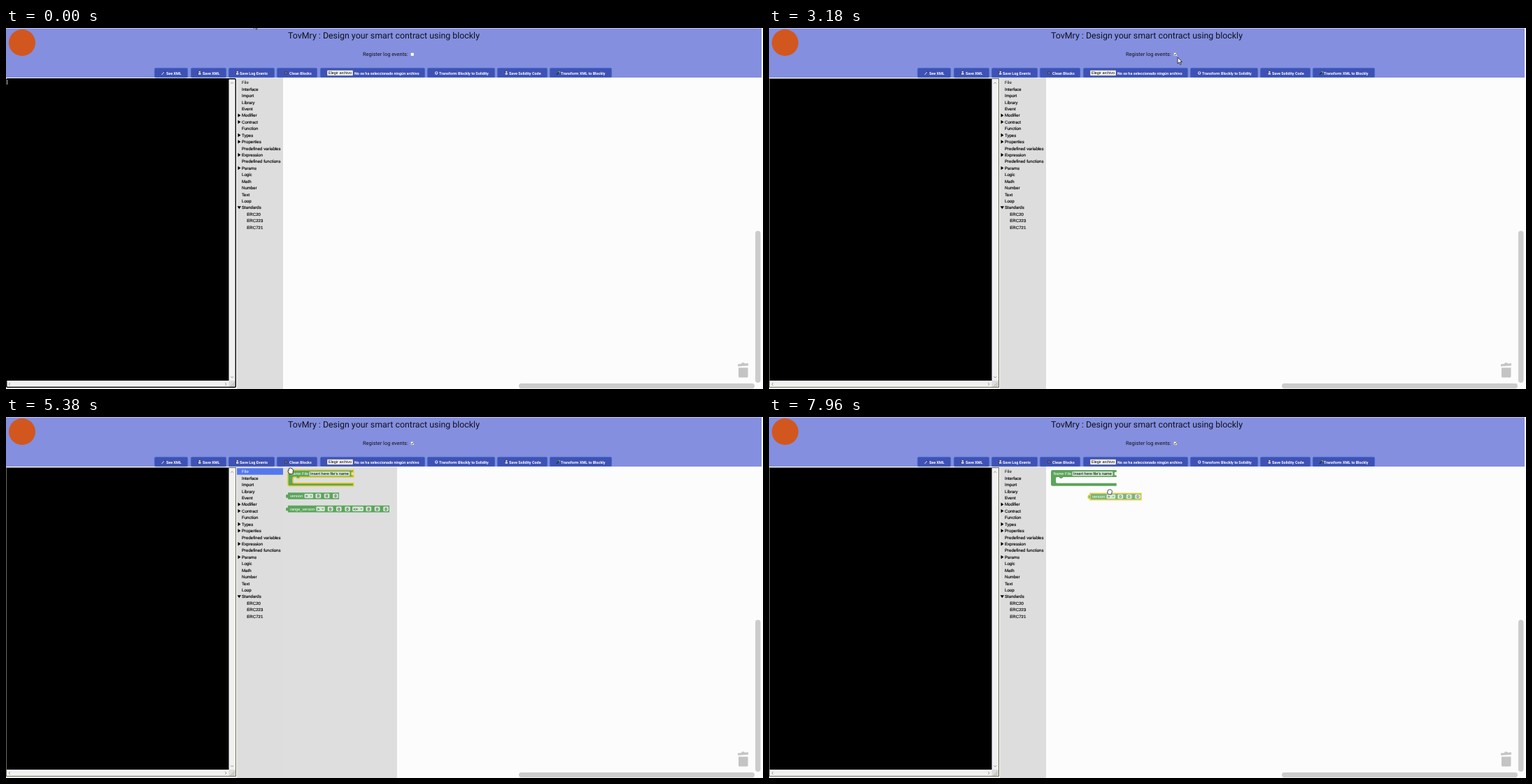
Write an HTML page that moves like this. It is 1082 px wide and 517 px high and loops after 8 s.

```html
<!DOCTYPE html>
<html lang="en">
<head>
<meta charset="utf-8">
<title>Block editor</title>
<style>
  html, body { margin: 0; width: 100%; height: 100%; overflow: hidden; background: #fcfcfc; }
  svg { display: block; width: 100vw; height: 100vh; }
  text { font-family: "Liberation Sans", Arial, sans-serif; white-space: pre; text-rendering: geometricPrecision; }
  .ui { font-family: Roboto, sans-serif; }
  .category { stroke: #000; stroke-width: .15px; }
</style>
</head>
<body>
<svg id="stage" viewBox="0 0 1082 517"></svg>
<script>
const LOOP = 8000;
const GREEN = '#5ba55b', FIELD = '#cfe4cf', YELLOW = '#e9c922';
const ROW_TOP = 73.3, ROW_H = 9.43;

const rect = (x, y, w, h, fill, extra = '') =>
  `<rect x="${x}" y="${y}" width="${w}" height="${h}" fill="${fill}" ${extra}/>`;
const path = (d, fill, extra = '') => `<path d="${d}" fill="${fill}" ${extra}/>`;
const label = (x, y, size, str, fill = '#000', extra = '') =>
  `<text x="${x}" y="${y}" font-size="${size}" fill="${fill}" ${extra}>${str}</text>`;
const group = (id, body) => `<g id="${id}">${body}</g>`;

// Header
const icons = {
  tool: (x) => path(`M${x} 67l3.6-4.2`, 'none', 'stroke="#b9c4dd" stroke-width="1.1"') +
    path(`M${x + 2.6} 62h2.6v2.6z`, '#26345f'),
  disk: (x) => rect(x, 62.2, 4.6, 4.4, '#2a3050') + rect(x + 1, 62.2, 2.6, 1.5, '#fff') +
    rect(x + .5, 64.5, 3.6, 2.1, '#f2f4fa'),
  bin: (x) => rect(x, 62, 4.4, 4.8, '#39446d') + rect(x + 1, 63, 2.4, 2.8, '#5d6890'),
  gear: (x) => `<circle cx="${x + 2.2}" cy="64.4" r="1.7" fill="none" stroke="#dfe5f2" stroke-width="1.1"/>`,
  leaf: (x) => path(`M${x} 67l4-4.4`, 'none', 'stroke="#243a2c" stroke-width="1.6"') +
    path(`M${x + 2} 62h3v3z`, '#4fb866')
};
const buttons = [
  [212, 260, 229, 'See XML', 'tool', 222.5],
  [264, 315, 281, 'Save XML', 'disk', 274.5],
  [318, 384, 334, 'Save Log Events', 'disk', 328.5],
  [387, 445, 405, 'Clean Blocks', 'bin', 398],
  [449, 599, 498, 'No se ha seleccionado ningún archivo'],
  [602, 699, 619, 'Transform Blockly to Solidity', 'gear', 613],
  [702, 774, 719, 'Save Solidity Code', 'disk', 713],
  [777, 866, 793, 'Transform XML to Blockly', 'leaf', 787]
];
const header = () =>
  rect(0, .5, 1080, 70.5, '#848fdf') +
  '<circle cx="23" cy="21" r="19" fill="#d2571e"/>' +
  label(677, 14.5, 12.4, 'TovMry : Design your smart contract using blockly', '#10121c', 'class="ui" text-anchor="end"') +
  label(510, 40.3, 7.45, 'Register log events:', '#10121c', 'class="ui"') +
  rect(578.5, 35.5, 4.5, 4.5, '#fff', 'rx=".6" stroke="#8b8b9a" stroke-width=".4"') +
  path('M579.3 37.8l1.2 1.3 2-2.7', 'none', 'id="tick" stroke="#222" stroke-width="1"') +
  buttons.map(([left, right, textX, str, icon, iconX]) =>
    rect(left + .4, 57.4, right - left - .8, 13.4, '#3f51b5', 'rx="1.6" stroke="#3d6ccc" stroke-width=".8"') +
    (icon ? icons[icon](iconX) : '') +
    label(textX, 66.5, 5.45, str, '#fff', 'class="ui" font-weight="700"')).join('') +
  rect(459, 60.6, 37, 7.6, '#f2f2f2', 'rx=".8" stroke="#555" stroke-width=".4"') +
  label(461, 66.3, 5.45, 'Elegir archivo');

// Code area on the left
const editor = () =>
  rect(0, 72, 329, 443, '#f1f1f1') +
  rect(1, 73, 317.5, 432, '#000') +
  rect(318.5, 505, 9.5, 9, '#dcdcdc') +
  path('M321.3 79.8l1.9-2 1.9 2M321.3 499l1.9 2 1.9-2M6 508l-2 2 2 2M313 508l2 2-2 2', 'none', 'stroke="#888" stroke-width=".8"') +
  path('M321 513.5l6-6M324 513.5l3-3', 'none', 'stroke="#888" stroke-width=".6"') +
  rect(.5, 72.5, 328, 442, 'none', 'id="thinBorder" stroke="#6e6e55"') +
  rect(.7, 72.7, 327.6, 441.8, 'none', 'id="focusBorder" rx="1.5" stroke="#000" stroke-width="1.4"') +
  rect(1, 74, .9, 7, '#ddd', 'id="caret"');

// Category tree
const categories = ['File', 'Interface', 'Import', 'Library', 'Event', '>Modifier', '>Contract',
  'Function', '>Types', '>Properties', 'Predefined variables', '>Expression', 'Predefined functions',
  '>Params', 'Logic', 'Math', 'Number', 'Text', 'Loop', 'vStandards', ' ERC20', ' ERC223', ' ERC721'];
const toolbox = () =>
  rect(330, 71.5, 66, 445.5, '#dddddd') +
  rect(330, 0, 66, ROW_H, '#e9e9e9', 'id="hoverRow"') +
  rect(330, ROW_TOP, 66, ROW_H, '#5577ee', 'id="selectedRow"') +
  categories.map((name, i) => {
    const mid = ROW_TOP + ROW_H * (i + .5);
    const arrow = { '>': `M331.5 ${mid - 2.7}v5.4l4-2.7z`, v: `M330.6 ${mid - 2}h5.4l-2.7 4z` }[name[0]];
    const indent = name[0] === ' ' ? 7.3 : 0;
    return (arrow ? path(arrow, '#000') : '') +
      label(337 + indent, mid + 2.2, 6.1, name.replace(/^[>v ]/, ''), '#000',
        i ? 'class="category"' : 'id="fileLabel"');
  }).join('');

const workspace = () =>
  rect(396, 71, 686, 446, '#fcfcfc') +
  rect(1071, 290.5, 7.5, 217.5, '#cccccc', 'rx="3.7"') +
  rect(733, 509, 337, 7.2, '#cccccc', 'rx="3.6"') +
  path('M1046 481.5l5.2-.5.4-1.4 3.4-.3.6 1.3 5.4-.3v3.2l-15 1z', '#c4c4c4') +
  path('M1047 486.5h13.5V499q0 1.5-1.5 1.5h-10.5q-1.5 0-1.5-1.5z', '#c4c4c4');

// Blocks
const field = (x, y, w, str, textX = x + 1.5) =>
  rect(x, y, w, 6.6, FIELD, 'rx="1.4"') + label(textX, y + 5.2, 5.6, str);
const dropdown = (x, y, w, str) => field(x, y, w, str) +
  path(`M${x + w - 4.4} ${y + 2.7}h2.6l-1.3 1.6z`, '#4a874a');
const digits = (y, ...centers) => centers.map(x => field(x - 3.9, y, 7.8, '0', x - 1.6)).join('');
const valueShape = (y, right) =>
  `M403 ${y}H${right}v9.6H403v-2.6c-1 1.4-3 1-3-1.8s2-3.2 3-1.8z`;

const nameBlock = () =>
  path('M403 78.2q0-2.2 2.2-2.2H496.7v3.2q-3-1.6-3 2t3 2V86H420.5l-1.5 1.8h-3l-1.5-1.8H412q-2 0-2 2v4.7q0 2 2 2H496.7v4H405.2q-2.2 0-2.2-2.2z', GREEN, 'id="nameShape"') +
  label(406.5, 83.2, 5.6, 'Name File', '#fff') +
  field(433.5, 78, 58, "Insert here file's name");
const versionBlock = () =>
  path(valueShape(108.2, 476), GREEN, 'id="versionShape"') +
  label(406, 115, 5.6, 'version', '#fff') +
  dropdown(426.5, 109.7, 12.6, '&gt;') + digits(109.7, 446.3, 458.6, 471);
const rangeBlock = () =>
  path(valueShape(126.8, 548), GREEN) +
  label(406, 133.6, 5.6, 'range_version', '#fff') +
  dropdown(443.3, 128.3, 12.6, '&gt;') + digits(128.3, 463.6, 475.8, 488.2) +
  dropdown(495, 128.3, 16, '&lt;=') + digits(128.3, 518.3, 530.6, 543);

const outlined = 'stroke="#000" stroke-width=".7" stroke-linejoin="round"';
const pointers = () =>
  group('arrow', path('M0 0V8.8L2.1 6.9 3.6 10.2 5 9.6 3.6 6.4H6.3Z', '#fff', outlined)) +
  group('openHand', path('M-2 4.6L-4 .5Q-4.3-1-2.8-.2L-3-3Q-2.2-4.2-1.4-3V-3.8Q-.4-5 .3-3.8V-3.2Q1.4-4.4 2-3V-2Q3.2-2.8 3.6-1.5L2.8 4.6Z', '#fff', outlined)) +
  group('closedHand', path('M-1.8 3.8L-3.5 1Q-3.6-.3-2.6-.4V-2Q-1.8-3.4-.8-2.8Q.2-3.8 1-2.8Q2.2-3.2 2.5-2Q3.5-1.8 3.4-.5L2.5 3.8Z', '#fff', outlined));

document.getElementById('stage').innerHTML =
  rect(0, 0, 1082, 517, '#fcfcfc') + header() + editor() + toolbox() + workspace() +
  group('flyout', rect(396, 71.5, 163, 445.5, '#dedede') + rangeBlock()) +
  group('nameBlock', nameBlock()) + group('versionBlock', versionBlock()) +
  group('pointer', pointers());

// Pointer path: time, x, y
const moves = [
  [0, 354, -8.2], [90, 354, -8.2], [690, 520, 19], [1200, 520, 19], [1980, 578, 38], [2020, 578, 38],
  [2240, 580, 42], [2710, 580, 42], [2880, 580, 37], [3040, 580, 37], [3480, 597, 58], [3530, 595, 60],
  [3910, 366, 88], [4220, 366, 88], [4300, 364, 79.5], [4560, 362, 78], [4990, 386, 80],
  [5340, 407, 77], [5600, 407, 77], [5890, 378, 85.5], [6320, 370, 79], [6580, 370, 79],
  [6780, 367, 78], [7100, 400, 100.5], [7350, 431, 106], [7500, 431, 106], [7960, 487, 107], [8000, 490, 107]
];
function pointerAt(t) {
  const i = moves.findIndex(m => m[0] > t);
  const [t0, x0, y0] = moves[i - 1], [t1, x1, y1] = moves[i];
  const u = (t - t0) / (t1 - t0), k = u * u * (3 - 2 * u);
  return [x0 + (x1 - x0) * k, y0 + (y1 - y0) * k];
}

const el = id => document.getElementById(id);
const show = (id, on) => { el(id).style.display = on ? '' : 'none'; };
const within = (t, a, b) => t >= a && t < b;
const highlight = (id, on) => {
  el(id).setAttribute('stroke', on ? YELLOW : 'none');
  el(id).setAttribute('stroke-width', 1.5);
};

function draw(t) {
  const [x, y] = pointerAt(t);
  const focused = t < 2960;
  const flyoutOpen = within(t, 4520, 5560) || within(t, 6800, 7540);
  const holding = within(t, 5440, 5600) || t >= 7440;
  const hovering = within(t, 5300, 5640) || t >= 7260;

  show('tick', t >= 2960);
  show('focusBorder', focused);
  show('thinBorder', !focused);
  show('caret', focused && (t < 440 || within(t, 950, 1460) || within(t, 1970, 2490)));

  const row = Math.floor((y - ROW_TOP) / ROW_H);
  show('hoverRow', x > 330 && x < 396 && row >= 0 && row < categories.length);
  el('hoverRow').setAttribute('y', ROW_TOP + row * ROW_H);
  show('selectedRow', flyoutOpen);
  el('fileLabel').setAttribute('fill', flyoutOpen ? '#fff' : '#000');

  show('flyout', flyoutOpen);
  show('nameBlock', t >= 4520);
  highlight('nameShape', within(t, 5340, 5780));
  const dragging = t >= 7500;
  show('versionBlock', flyoutOpen || dragging);
  highlight('versionShape', t >= 7440);
  el('versionBlock').setAttribute('transform', dragging ? `translate(${x - 431} ${y - 106})` : '');
  el('versionBlock').setAttribute('opacity', dragging ? .8 : 1);

  el('pointer').setAttribute('transform', `translate(${x} ${y})`);
  show('closedHand', holding);
  show('openHand', hovering && !holding);
  show('arrow', !hovering && !holding);
}

const start = performance.now();
function tick() {
  draw((performance.now() - start) % LOOP);
  requestAnimationFrame(tick);
}
tick();
</script>
</body>
</html>
```
